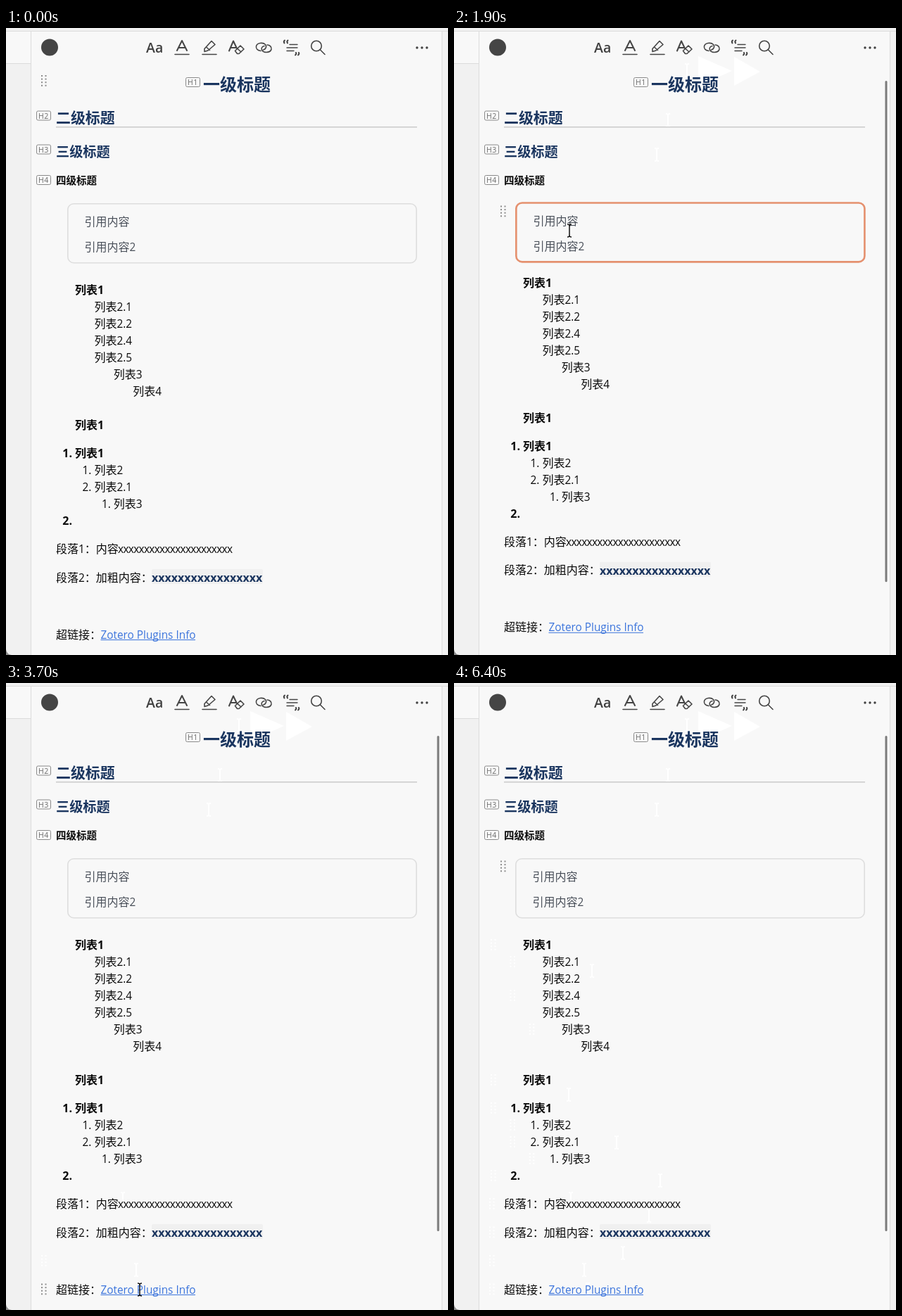
Animation of 628 by 891 pixels, one loop 7000 ms. Source, as an HTML page:

```html
<!DOCTYPE html>
<html lang="zh-CN">
<head>
<meta charset="utf-8">
<title>Note editor</title>
<style>
html, body { margin: 0; width: 100%; height: 100%; overflow: hidden; background: #f8f8f8; }
svg { display: block; width: 628px; height: 891px; }
text { font-family: "Open Sans", "Noto Sans CJK SC", "Noto Sans CJK", sans-serif; white-space: pre; }
.icon { fill: none; stroke: #454545; stroke-width: 1.6; stroke-linecap: round; stroke-linejoin: round; }
</style>
</head>
<body>
<svg id="stage" viewBox="0 0 628 891"></svg>
<script>
const LOOP = 7000, STEP = 100, START = 200, END = 6400;
const NAVY = '#1a355f', LINK = '#3b74dc';

// Text placed by its edge and the middle of its line.
function label(s, x, cy, { size = 16, bold = false, fill = '#0a0a0a', extra = '' } = {}) {
  const latin = bold ? size : size * 0.96;
  const body = s.replace(/[ -~]+/g, m => `<tspan font-size="${latin}">${m}</tspan>`);
  return `<text x="${x}" y="${cy + size * 0.38}" font-size="${size}" font-weight="${bold ? 700 : 400}" fill="${fill}" ${extra}>${body}</text>`;
}

const rect = (x, y, w, h, attrs) => `<rect x="${x}" y="${y}" width="${w}" height="${h}" ${attrs}/>`;

function grip(x, y, fill) {
  let s = '';
  for (let i = 0; i < 8; i++)
    s += rect(x - 4 + (i % 2) * 5.5, y - 8 + (i >> 1) * 4.6, 2, 2, `fill="${fill}"`);
  return s;
}

const beam = (x, y, color, w) =>
  `<path d="M${x - 3} ${y - 9}q3 0 3 2q0-2 3-2M${x} ${y - 7}V${y + 7}M${x - 3} ${y + 9}q3 0 3-2q0 2 3 2" fill="none" stroke="${color}" stroke-width="${w}"/>`;

const chrome =
  rect(0, 0, 628, 891, 'fill="#f8f8f8"') +
  rect(0, 0, 628, 4, 'fill="#f1f1f1"') +
  rect(0, 51, 35, 840, 'fill="#f1f1f1"') +
  rect(620, 5, 8, 886, 'fill="#f2f2f2"') +
  '<path d="M0 4.5H628M0 50.5H35M35.5 5V891M619.5 5V891" stroke="#dcdcdc" fill="none"/>' +
  '<path d="M0 883Q1 890 8 891H0Z" fill="#8a8a8a"/>';

const dots = [0, 1, 2].map(i => `<circle cx="${584 + 7 * i}" cy="28" r="1.7" fill="#404040"/>`).join('');
const toolbar =
  '<circle cx="62" cy="27.5" r="12" fill="#454545"/>' +
  '<text x="199" y="34.5" font-size="19.5" font-weight="600" fill="#404040">Aa</text>' +
  `<g class="icon">
    <path d="M243 32L250 18L257 32M245.500 28H254.500" stroke-width="2"/>
    <path d="M240 37.500H260M279 37.500H299"/>
    <path d="M282 33.500V29.500L292 18.500L297 23.500L287 32L282 33.500M284.500 27L289.500 31.500"/>
    <path d="M317 32.500L323 18.500L328 29M319.500 28H326" stroke-width="2"/>
    <path d="M325.500 32.500L333 25L338 30L331 36.500H328.500ZM329 29.500L334 34"/>
    <path d="M362 32.500C357 32 355 29 355.500 26C356.500 21 365 20 368.500 23.500C371 26.500 369 30.500 365.500 31"/>
    <path d="M371 24C375 24 377.500 27 377 30C376 35 367 36 364 32C362 29.500 363.500 26 367 25.500"/>
    <path d="M403 23.500H414M399 28H414M399 32.500H409" stroke-width="1.4"/>
    <path d="M396 17.500q-2 1.500-.5 4m5-4q-2 1.500-.5 4M412 35q1 2-1 3.500m5-3.500q1 2-1 3.500" stroke-width="2"/>
    <circle cx="441" cy="25.500" r="7.300"/><path d="M446.500 31L453 37.500"/>
  </g>` + dots;

// Blocks the pointer can hover: middle, grip position, whether the list shift moves them.
const blocks = [{ y: 75, gx: 54, gy: 75 }, { y: 292, gx: 70, gy: 260.5 }];

function heading(level, s, x, y, size, fill = NAVY) {
  const bx = level === 1 ? 255 : 43, by = y - 3 * (level < 4);
  if (level > 1) blocks.push({ y });
  return rect(bx + 0.5, by - 6.5, 20, 13, 'rx="2" fill="none" stroke="#8a8a8a"') +
    `<text x="${bx + 10.5}" y="${by + 4}" font-size="10.5" text-anchor="middle" fill="#6c6c6c" letter-spacing=".6">H${level}</text>` +
    label(s, x, y, { size, bold: true, fill });
}

// Tabs give the depth; a leading "1. " becomes a hanging number.
function list(top, src) {
  return src.split('\n').map((line, i) => {
    const [, tabs, num, s] = line.match(/^(\t*)(\d\. )?(.*)$/);
    const x = 98 + 27.4 * tabs.length, y = top + 24 * i, bold = !tabs;
    blocks.push({ y, gx: x - 42, gy: y, moves: true });
    return (num ? label(num.trim(), x - 4, y, { bold, extra: 'text-anchor="end"' }) : '') +
      label(s, x, y, { bold });
  }).join('');
}

function paragraph(s, i) {
  const y = 740 + 40.5 * i;
  blocks.push({ y, gx: 54, gy: y, moves: true });
  return label(s, 71, y);
}

const headings =
  heading(1, '一级标题', 280, 80, 24) +
  heading(2, '二级标题', 71, 127.5, 20.9) +
  rect(71, 140, 513, 1.5, 'fill="#cbcbcb"') +
  heading(3, '三级标题', 71, 175.5, 19.2) +
  heading(4, '四级标题', 71, 216, 14.5, '#0a0a0a');

const content =
  list(372, '列表1\n\t列表2.1\n\t列表2.2\n\t列表2.4\n\t列表2.5\n\t\t列表3\n\t\t\t列表4') +
  list(564, '列表1') +
  list(604, '1. 列表1\n\t1. 列表2\n\t2. 列表2.1\n\t\t1. 列表3\n2. ') +
  ['段落1：内容', '段落2：加粗内容：', '', '超链接：'].map(paragraph).join('') +
  label('x'.repeat(22), 159, 740, { extra: 'letter-spacing="-.67"' }) +
  rect(207, 769, 158, 21, 'rx="2" fill="#f0f0f0"') +
  label('x'.repeat(17), 207, 781, { bold: true, fill: NAVY }) +
  label('Zotero Plugins Info', 134.5, 861.5, { fill: LINK }) +
  rect(134.5, 869, 134.5, 1, `fill="${LINK}"`);

// Pointer stops: time, x, y
const path = [
  [START, 331, 60], [800, 314, 80], [1100, 314, 80], [1200, 304, 131], [1400, 288, 180],
  [1900, 164, 288], [2400, 164, 307], [2800, 166, 733], [3300, 185, 834], [3700, 190, 862],
  [4100, 190, 862], [4500, 240, 810], [5000, 277, 757], [5200, 293, 707],
  [5500, 231, 653], [5800, 163, 585], [6100, 196, 409], [END, 200, 300]
];

function pointer(t) {
  const i = path.findIndex(k => k[0] > t);
  if (i < 1) return path.at(i).slice(1);
  const [t0, x0, y0] = path[i - 1], [t1, x1, y1] = path[i];
  const f = (t - t0) / (t1 - t0);
  return [x0 + (x1 - x0) * f, y0 + (y1 - y0) * f];
}

// The grip follows the pointer a little late.
function hovered(t) {
  if (t < START) return blocks[0];
  const y = pointer(Math.max(START, t - 40))[1];
  const far = b => Math.abs(b.y - y);
  return blocks.reduce((a, b) => far(b) < far(a) ? b : a);
}

const clamp = v => Math.min(1, Math.max(0, v));
const fade = (t, from, to) => clamp(Math.min(t - from, to - t) / 300);
const hover = t => fade(t, 1680, 2820) + fade(t, 6150, END);
const mix = (a, b, f) => `rgb(${a.map((v, i) => Math.round(v + (b[i] - v) * f))})`;

// Pale marks the recording leaves where the pointer and grips have been.
function traces(t) {
  if (t < START) return '';
  let s = '<path d="M347 40l48 21l-48 21ZM398 41l37 21l-37 20Z" fill="#fff"/>';
  path.forEach(([, x, y], i) => {
    const overQuote = y > 249 && y < 335;
    if (!overQuote && t >= path[i + 1]?.[0]) s += beam(x, y, '#fff', 1.8);
  });
  const seen = new Set();
  for (let u = 3400; u < Math.min(t, END); u += STEP) seen.add(hovered(u));
  for (const b of seen) if (b.moves) s += grip(b.gx, b.gy, '#fff');
  return s;
}

function quote(h) {
  const border = 1.6 + 1.4 * h, lift = -2.5 * Math.sin(Math.PI * h);
  const dx = 1.5 * h, dy = lift + h;
  const ink = { fill: '#4a505a' };
  const stroke = mix([222, 222, 222], [231, 117, 70], h);
  return rect(87 + border / 2, 249 + lift + border / 2, 497 + h - border, 85.5 + 1.5 * h - border,
    `rx="8.5" fill="none" stroke="${stroke}" stroke-width="${border}"`) +
    label('引用内容', 111.5 + dx, 275 + dy, ink) +
    label('引用内容2', 111.5 + dx, 311 + dy, ink);
}

function caret(t) {
  if (t < 1000 || t >= 4500 || Math.floor(t / 500) % 2) return '';
  return t < 1600 ? rect(178.5, 408, 1, 21, 'fill="#111"') : rect(147.5, 161, 1, 26, 'fill="#111"');
}

const stage = document.getElementById('stage');
stage.innerHTML = `${chrome}<g id="traces"></g>${toolbar}${headings}
  <g id="quote"></g><g id="content">${content}</g><g id="top"></g>`;
const part = id => document.getElementById(id);

function draw(t) {
  const h = hover(t), shift = -11 * (1 - (1 - h) ** 2);
  part('traces').innerHTML = traces(t);
  part('quote').innerHTML = quote(h);
  part('content').setAttribute('transform', `translate(0 ${shift})`);

  const b = hovered(t);
  let s = caret(t);
  if (b.gx) s += grip(b.gx, b.gy + (b.moves ? shift : 0), '#8c8c8c');
  if (t >= START) s += rect(612.5, 75, 3, 704 - shift * 0.8, 'rx="1.5" fill="#7b7b7b"');
  if (t >= START && t < END) s += beam(...pointer(t), '#111', 1.5);
  part('top').innerHTML = s;
}

let last = -1;
function tick(now) {
  const t = Math.floor((now % LOOP) / STEP) * STEP;
  if (t !== last) draw(last = t);
  requestAnimationFrame(tick);
}
draw(0);
requestAnimationFrame(tick);
</script>
</body>
</html>
```
